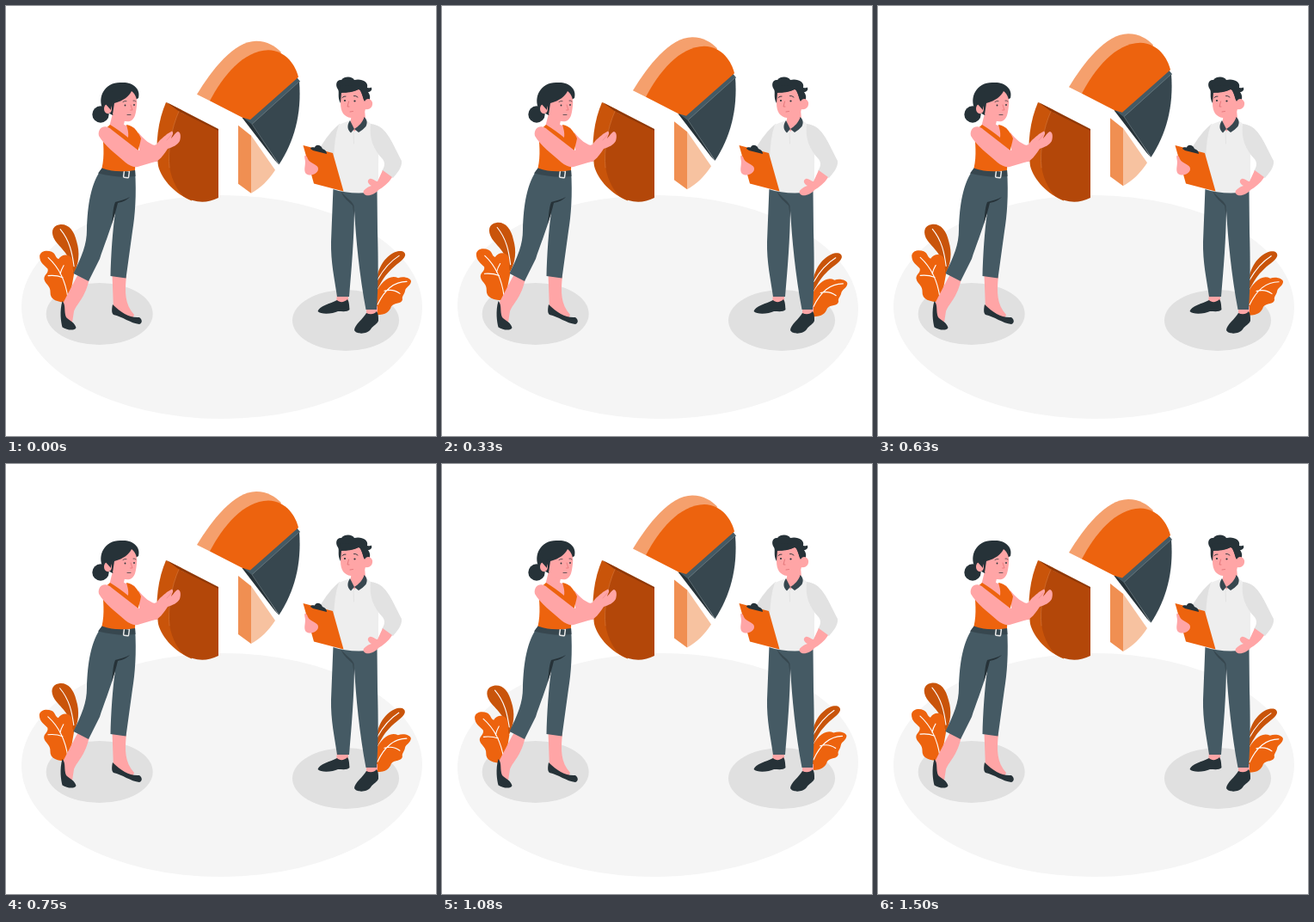
These frames come from a looping animation (500x500 px, 1.54 s). An HTML page:

```html
<!DOCTYPE html>
<html lang="en">
<head>
<meta charset="utf-8">
<title>Building a chart</title>
<style>
  html, body { margin: 0; width: 100%; height: 100%; overflow: hidden; background: #fff; }
  svg { display: block; width: 100%; height: 100%; }
  .skin { fill: #ffa5a6; }
  .ink { fill: #263238; }
  .slate { fill: #37474f; }
  .denim { fill: #455a64; }
  .orange { fill: #ed630e; }
  .rust { fill: #c9540a; }
  .shade { fill: #e0e0e0; }
  .line { fill: none; stroke-linecap: round; stroke-linejoin: round; }
</style>
</head>
<body>
<svg viewBox="0 0 500 500" xmlns="http://www.w3.org/2000/svg">
  <g id="floor"><ellipse cx="251" cy="350" rx="233" ry="130" fill="#f5f5f5"/></g>
  <ellipse class="shade" cx="108.700" cy="358" rx="62" ry="36"/>
  <ellipse class="shade" cx="395" cy="365.500" rx="62" ry="35.500"/>

  <g id="plants">
    <path class="rust" d="M78 313C85 300 86 287 82 274C79 261 72 253 62 254.500C53 256 51.500 264 57 273C66 285 76 290 78 313Z"/>
    <path class="orange" d="M73 345C60 345 51 342 51.500 333C52 327 47 324 45 320C42 313 50 312 48.500 306C45 302 39 299 39 291C40 284.500 48 284 53 286C58 288 57 293 61 294.500C65 288 74 288 77 295C79 303 76 307 79 312Z"/>
    <g class="line" stroke="#fff" stroke-width="1.100">
      <path d="M63 260C74 273 77 288 79 303M49 293C60 303 69 318 72 340M67 302Q64 307 63 312M49 314Q58 313 66 316"/>
    </g>
    <path class="rust" d="M430 332C429 305 441 291 452 286C459 283 465 285 464 290C462 296 453 300 446 308C439 315 436 322 430 332Z"/>
    <path class="orange" d="M430 333C436 321 446 311 456 316C462 313.500 471 316 471 320C470 326 465 326 464 331C463 336 460 337 461 341C460 347 452 344 448 349C446 355 442 359 431 359Z"/>
    <g class="line" stroke="#fff" stroke-width="1.100">
      <path d="M457 290C446 297 438 307 432 318M466 320C450 320 439 332 432 347M440 331Q450 328 458 334"/>
    </g>
  </g>

  <g id="chart">
    <path fill="#f5a06d" d="M222 103C239 75 265 41 291 41C304 41 313 47 320 54L300 80L237 110.500Z"/>
    <path class="ink" d="M274.500 130L281 129L288 138L317 184.500L312.500 179.500Z"/>
    <path class="denim" d="M277 131L338 83L342 88L286 138Z"/>
    <path class="orange" d="M237 110.500C252 82 276 52 305 51.500C326 52 337 70 340 83L284 132.500L275 130Z"/>
    <path class="slate" d="M286 137.500L341 88C344 126 335 158 317.500 184.500Z"/>
    <path class="line" stroke="#78868c" stroke-width=".6" d="M317 184L286 137.500L341 88"/>
    <path fill="#f7c2a0" d="M284.500 150L313 191C306 202 296 212 285 218Z"/>
    <path fill="#f08f52" d="M270 139L285 151V218L270 207Z"/>
  </g>

  <!-- piece held by the woman -->
  <path class="rust" d="M186 112L204 121L216 226.500C197 219 181 202 177 186C173 160 177 133 186 112Z"/>
  <path fill="#8f3807" d="M186 111.500L247 143V148L201 122.500Z"/>
  <path fill="#b34709" d="M201 122.500L247 145V223C233 230 219 229 206 221C182 195 187 155 201 122.500Z"/>
  <path class="line" stroke="#d97a3b" stroke-width=".6" d="M201 122.500C192 143 188 168 190 188"/>

  <!-- woman -->
  <g>
    <path class="skin" d="M84 312L96.500 319C91 341 83 345 79 355L77 368L68 364L66 346C71 337 76 326 84 312Z"/>
    <path class="ink" d="M65.500 343C62 355 64 368 65.500 373.500C71 377 80 378 81.500 374C80 368 74 366 70 362C67 355 70 348 65.500 343Z"/>
    <path class="skin" d="M123.500 312L140 314C138 332 138 347 149 359L147 364L125 354Z"/>
    <path class="ink" d="M124 347C123 352 122.500 357 125 359C135 361 145 369 155 370C159 369 158.500 364 155 362C144 363 134 357 124 347Z"/>
    <path class="denim" d="M112 188C126 193 140 193 150 190C152 220 150 244 147 262L139.500 316.500L121.500 314C122 290 124 260 127 240C121 262 113 281 109 294L96 320L78.500 311C88 291 94 278 94 260C95 232 98 207 112 188Z"/>
    <path class="slate" d="M112 188C126 193 140 193 150 190L150.500 198C136 200 121 198 107 194.500Z"/>
    <path class="ink" d="M123 254C124 246 124 236 127 228C133 226 139 225 144 222C139 227 134 228 130 229C128 238 125 246 123 254Z"/>
    <rect x="137" y="191.500" width="6" height="8" rx="1" fill="none" stroke="#e8e8e8" stroke-width="1.500" transform="rotate(8 140 195.500)"/>
    <path class="skin" d="M154 147C160 155 168 162 177 163L176 181L156 182Z"/>
    <path class="skin" d="M120 141L124 125L139 128L137 138L150 142L142 160L122 155Z"/>
    <path class="orange" d="M112 146L121 138C129 143 136 148 142 153C143 147 141 142 140 138C149 139 154 147 157 154C155 165 150 178 150 191C137 193 124 193 111.500 188.500C115 174 113 158 112 146Z"/>
    <path class="skin" d="M108 151C106 142 115 136 123 144L154 168L175 161C179 155 184 152 187 149L193 145.500C196 148 192 152 192 154C195 151 197 147 200 146C204 147 203 154 202 157C199 162 194 164 188 166C184 172 180 178 175 180.500L153 187C148 188 143 185 139 182C128 172 114 162 108 151Z"/>
    <path class="line" stroke="#e98587" stroke-width=".6" d="M187 156Q190 153 192 150"/>
    <circle class="ink" cx="110" cy="126" r="9.700"/>
    <path class="ink" d="M113 121C105 105 116 88 134 89C147 88 157 96 154 107L146 112L124 127Z"/>
    <path class="skin" d="M126 113C137 110 143 105 146 99C151 103 153 109 152 116C151 125 150 132 144 134C137 135 129 132 124 126Z"/>
    <ellipse class="skin" cx="118.500" cy="119.500" rx="4.500" ry="5.800"/>
    <path class="ink" d="M122 121L123 111C136 109 144 102 147 94L128 94L114 112Z"/>
    <g class="ink"><circle cx="138.500" cy="115.500" r=".9"/><circle cx="149" cy="115" r=".9"/></g>
    <path class="line" stroke="#263238" stroke-width=".7" d="M136 111.500Q138 110 140 110.500M148 110Q149.500 109.500 151 111M141 126.500L145 126.500"/>
    <path class="line" stroke="#e66f73" stroke-width=".7" d="M145 115L147 121L144.500 121"/>
  </g>

  <!-- man -->
  <g>
    <path class="skin" d="M385 334H398V347L391 350L384 346ZM419 349H432V361L425 365L419 361Z"/>
    <path class="ink" d="M385 342C377 346 364 349 362.500 355C366 359 380 358 386 355C392 355 397 356 399.500 353C399 347 399 344 397 341C393 345 388 345 385 342Z"/>
    <path class="ink" d="M419 357C416 363 405 371 405 377C407 382 420 382 424 376C427 371 432 370 433 366C433 361 433 358 431 355C428 359 423 359 419 357Z"/>
    <path class="denim" d="M380.500 211C400 218 415 218 431.500 213L432 262C433 298 433 323 431 353H418.500C411 313 407 272 405 238C404.500 273 402 303 399 338H385C382 317 377.500 298 378 274Z"/>
    <path class="slate" d="M389 215C396 224 402 226 404.500 232L405 246L403 232C398 227 393 224 389 215Z"/>
    <path class="shade" d="M388 137C379 144 371 155 365 165L379 180L390 170Z"/>
    <path fill="#eee" d="M387 138L400 133L420 134C432 140 434 160 433 190V215C416 219 395 218 380 213C382 186 379 161 387 138Z"/>
    <path fill="#e2e2e2" d="M424 137C442 139 447 155 460 180C461 188 454 195 450 200L437 192C441 186 441 181 437 177C428 167 422 155 424 137Z"/>
    <path class="skin" d="M438 191L449 199C445 206 438 211 433 214C429 219 419 223 416 218C414 215 419 211 425 209C421 207 419 203 423 201C426 200 429 204 432 204Z"/>
    <path class="skin" d="M402 125L417 120L418 132L405 146L400 138Z"/>
    <path class="slate" d="M400 133L405 143C410 140 415 135 416.500 129C420 132 420.500 136 418.500 140C416 143 413 145 410 147L405 143L401 147.500C397 144 396 139 400 133Z"/>
    <path class="line" stroke="#dedede" stroke-width=".7" d="M404 147L404.500 160"/>
    <path class="ink" d="M389 113C385 106 388 100 386 97C382 91 385 85 390 86C394 81 403 82 405 86C413 84 422 88 420 95C425 96 426 94 424.500 94C427 98 423 100 421 100C425 105 423 111 420 114L413 125L397 123Z"/>
    <path class="skin" d="M390 101C397 100 404 100 410 97C415 99 414 107 417 111C419 107 424 107 426 112C427 118 422 121 418 120C416 128 409 131 401 130C393 129 389 123 389 113Z"/>
    <path class="ink" d="M388 100C399 102 406 99 411 96L417 110L421 103L418 93L389 92Z"/>
    <g class="ink"><circle cx="394" cy="110" r="1.100"/><circle cx="405.500" cy="110.500" r="1.100"/></g>
    <path class="line" stroke="#263238" stroke-width=".9" d="M391 106.500Q393 104.500 395 105M404.500 104.500Q407 104 409 106"/>
    <path class="line" stroke="#d9656a" stroke-width=".7" d="M398.500 111L397 117L399 117M400 123L403.500 122.500"/>
    <path class="orange" d="M345.500 162L380 171L392.500 215.500L358 206.500Z"/>
    <path class="ink" d="M354 166C354 164 357 164 359 164.500C360 160.500 366 161 368 166C371 167 373 169 373 172L357 168Z"/>
    <path class="skin" d="M347.500 178C346 171 350 174 351 178C354 184 364 184 363 190C362 196 352 199 348 194C346 189 349 184 347.500 178Z"/>
  </g>
</svg>
<script>
  const LOOP = 1540;
  const byId = id => document.getElementById(id);
  const floor = byId('floor'), plants = byId('plants'), chart = byId('chart');

  // Cosine wave over one loop, at its highest at time peak.
  const wave = (t, peak) => Math.cos(2 * Math.PI * (t - peak) / LOOP);

  function draw(t) {
    const tilt = `rotate(${0.86 * wave(t, 330) - 0.1} 251 350)`;
    floor.setAttribute('transform', tilt);
    plants.setAttribute('transform', tilt);
    chart.setAttribute('transform', `translate(0 ${-4.5 * (1 + wave(t, 700))})`);
  }

  const start = performance.now();
  function tick() {
    draw((performance.now() - start) % LOOP);
    requestAnimationFrame(tick);
  }
  tick();
</script>
</body>
</html>
```
